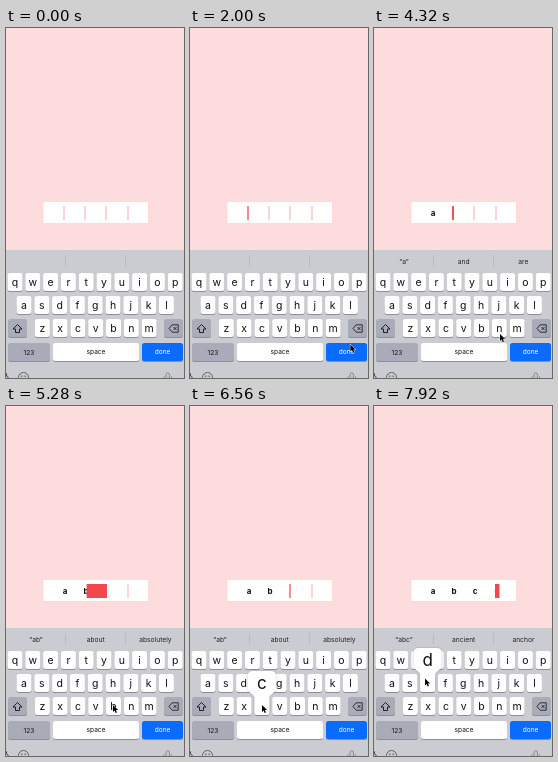
Recreate the animation shown at these times as an HTML page with a canvas. Size 178 px wide and 350 px high, loop 8000 ms.

```html
<!DOCTYPE html>
<html lang="en">
<head>
<meta charset="utf-8">
<title>Code input</title>
<style>
  html, body { margin: 0; width: 100%; height: 100%; overflow: hidden; background: #fddcdd; }
  canvas { display: block; width: 178px; height: 350px; }
</style>
</head>
<body>
<canvas></canvas>
<script>
const LOOP = 8000, W = 178, H = 350;
const canvas = document.querySelector('canvas');
const ctx = canvas.getContext('2d');
const dpr = window.devicePixelRatio || 1;
canvas.width = W * dpr;
canvas.height = H * dpr;

const RED = '#f2474d', INK = '#111';
const PITCH = 17.8, KEY_W = 15, KEY_H = 18;
const rows = [['qwertyuiop', 9, 245], ['asdfghjkl', 18, 268], ['zxcvbnm', 36.3, 291]];
const bars = [37, 57, 78, 99, 121, 141];
const focusAt = 1420;
const typed = [['a', 3200], ['b', 5100], ['c', 6600], ['d', 7900]];
const suggestions = [
  [3340, ['“a”', 'and', 'are']],
  [5180, ['“ab”', 'about', 'absolutely']],
  [6760, ['“abc”', 'ancient', 'anchor']]
];
// Pointer stops: time, x, y
const pointer = [
  [440, 150, 325], [800, 9, 255], [1100, 45.5, 188], [1440, 45.5, 188],
  [1940, 163, 317], [2160, 149, 314], [2360, 149, 314], [2880, 17, 275.5],
  [3360, 17, 275.5], [4000, 131, 311], [4240, 131, 311], [4320, 126, 306],
  [4700, 107, 299], [5600, 107, 299], [6300, 72, 299], [6880, 72, 299],
  [7600, 51, 272.5], [LOOP, 51, 272.5]
];

const clamp = v => Math.max(0, Math.min(1, v));
const ease = v => v * v * (3 - 2 * v);

function box(x, y, w, h, color, r = 0) {
  ctx.fillStyle = color;
  ctx.beginPath();
  ctx.roundRect(x, y, w, h, r);
  ctx.fill();
}

function text(str, x, y, size, color = INK, weight = 400) {
  ctx.font = `${weight} ${size}px Inter, sans-serif`;
  ctx.textAlign = 'center';
  ctx.fillStyle = color;
  ctx.fillText(str, x, y);
}

function key(x, y, w, color = '#fefefe') {
  box(x, y + 1, w, KEY_H, '#8d8f98', 2.5);
  box(x, y, w, KEY_H, color, 2.5);
}

function stroke(path, color = INK, width = 0.9) {
  ctx.strokeStyle = color;
  ctx.lineWidth = width;
  ctx.stroke(new Path2D(path));
}

function keyboard() {
  box(0, 222, W, 128, '#cbccd2');
  box(59.2, 227, 0.7, 11, '#b3b4bb');
  box(119.2, 227, 0.7, 11, '#b3b4bb');
  for (const [letters, x0, y] of rows) {
    [...letters].forEach((c, i) => {
      const x = x0 + i * PITCH;
      key(x - KEY_W / 2, y, KEY_W);
      text(c, x, y + 12.5, 10.5);
    });
  }
  key(2, 291, 19, '#a9acb8');
  key(158, 291, 19, '#a9acb8');
  stroke('M11.5 296.5l-4.5 4.5h2.5v3.5h4v-3.5h2.5z');
  stroke('M163 300.5l3.2-3.7h6v7.4h-6zM167.5 299l3 3M170.5 299l-3 3', INK, 0.8);
  key(2, 315, 42, '#a9acb8');
  key(47, 315, 86);
  key(136, 315, 41, '#0a6cff');
  text('123', 23, 326.5, 6.6);
  text('space', 90, 326.3, 6.6);
  text('done', 156.5, 326.3, 6.6, '#fff');
  ctx.beginPath();
  ctx.arc(17.5, 349.5, 5, 0, Math.PI * 2);
  ctx.strokeStyle = '#55575e';
  ctx.lineWidth = 0.9;
  ctx.stroke();
  box(15.3, 347.5, 1.1, 1.5, '#55575e');
  box(18.6, 347.5, 1.1, 1.5, '#55575e');
  stroke('M160 350v-3.5a1.7 1.7 0 0 1 3.4 0v3.5M158 348.5v1.5M165.4 348.5v1.5', '#75777e', 0.8);
  stroke('M0 345q.4 3.5 2.5 5', '#333', 0.9);
}

function popup(c) {
  const [letters, x0, y] = rows.find(row => row[0].includes(c));
  const x = x0 + letters.indexOf(c) * PITCH;
  ctx.save();
  ctx.translate(x, y);
  ctx.shadowColor = '#0004';
  ctx.shadowBlur = 2 * dpr;
  ctx.fillStyle = '#fefefe';
  ctx.fill(new Path2D('M-9.5-26h19q4.5 0 4.5 4.5v13c0 5-6.5 5-6.5 10v14q0 2.5-2.5 2.5h-10q-2.5 0-2.5-2.5v-14c0-5-6.5-5-6.5-10v-13q0-4.5 4.5-4.5z'));
  ctx.restore();
  text(c, x, y - 8, 17);
}

function field(t) {
  box(37.5, 174, 104.5, 21, '#fefefe');
  const count = typed.filter(([, at]) => t >= at).length;
  for (let i = count + 1; i < 5; i++) box(bars[i], 178, 2, 14, '#fbd5d7');
  for (let i = 0; i < count; i++) text(typed[i][0], bars[i + 1] + 2, 187.6, 8, INK, 700);
  if (t < focusAt) return;

  // The block stretches to the next bar, then its trailing edge catches up.
  const since = t - (count ? typed[count - 1][1] : focusAt);
  const from = bars[count], to = bars[count + 1];
  const right = from + 2 + (to - from) * clamp(since / 170);
  const left = from + (to - from) * ease(clamp((since - 130) / 230));
  const pulse = 0.75 + 0.25 * Math.cos(since / 1000 * Math.PI * 2);
  ctx.globalAlpha = since < 360 ? 1 : pulse;
  box(left, 178, right - left, 14, RED);
  ctx.globalAlpha = 1;
}

function drawPointer(t) {
  const i = pointer.findIndex(([at]) => at > t);
  if (i < 1) return;
  const [t0, x0, y0] = pointer[i - 1], [t1, x1, y1] = pointer[i];
  const k = ease((t - t0) / (t1 - t0));
  ctx.save();
  ctx.translate(x0 + (x1 - x0) * k, y0 + (y1 - y0) * k);
  const arrow = new Path2D('M0 0v7l1.6-1.5 1.1 2.6 1.3-.6-1.1-2.5h2.2z');
  ctx.strokeStyle = '#fff';
  ctx.lineWidth = 0.9;
  ctx.stroke(arrow);
  ctx.fillStyle = '#000';
  ctx.fill(arrow);
  ctx.restore();
}

function draw(t) {
  ctx.setTransform(dpr, 0, 0, dpr, 0, 0);
  box(0, 0, W, H, '#fddcdd');
  field(t);
  keyboard();
  const current = suggestions.findLast(([at]) => t >= at);
  if (current) current[1].forEach((word, i) => text(word, 30 + i * 59.7, 235.5, 6.7, '#222'));
  for (const [c, at] of typed) if (t >= at - 40 && t < at + 120) popup(c);
  drawPointer(t);
}

const start = performance.now();
function frame() {
  draw((performance.now() - start) % LOOP);
  requestAnimationFrame(frame);
}
frame();
</script>
</body>
</html>
```
